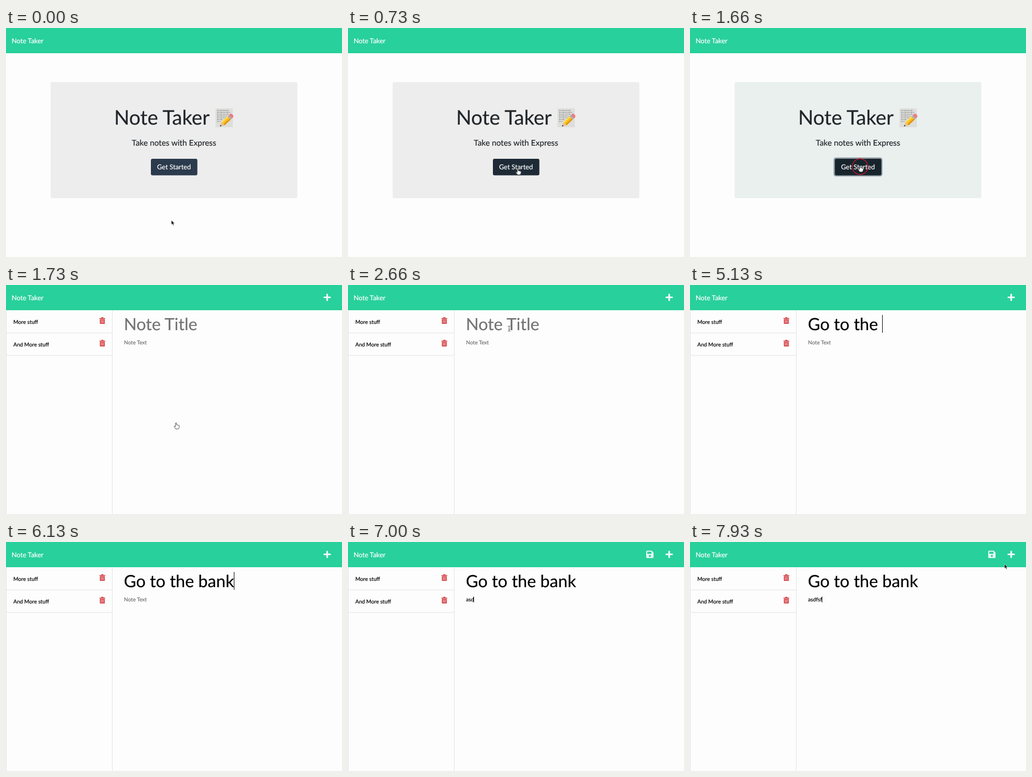
An HTML page for the animation above (8 s loop, 640 by 436 pixels).

```html
<!DOCTYPE html>
<html lang="en">
<head>
<meta charset="utf-8">
<title>Note Taker</title>
<style>
  html, body { margin: 0; width: 100%; height: 100%; overflow: hidden; background: #fdfdfd; }
  svg { display: block; width: 640px; height: 436px; font-family: Lato, sans-serif; }
  text { white-space: pre; fill: currentColor; stroke: currentColor; stroke-width: .2; text-rendering: geometricPrecision; }
  .brand, .btn { font-size: 12.75px; color: #fff; }
  .item, .body { font-size: 10.2px; }
  .title { font-size: 32.05px; }
  .dark { color: #212529; }
  .hint { color: #737373; }
  .rule { fill: none; stroke: #e3e3e3; }

  /* Everything runs on one 8 s loop. */
  .home, .notes, .ring, .arrow, .hand, .beam, .panel, .button, .focus {
    animation: 8s step-end infinite;
  }
  .home { animation-name: home; }
  .notes { animation-name: notes; }
  .panel { animation-name: panel; }
  .button { animation-name: button; }
  .focus { animation-name: focus; }
  .ring { animation-name: ring; fill: none; stroke: #c4182f; stroke-width: 1.4; }
  .arrow { animation-name: arrow; }
  .hand { animation-name: hand; }
  .beam { animation-name: beam; }
  .pointer { animation: move 8s ease-in-out infinite; }

  @keyframes home { 0% { visibility: visible } 21.625%, 100% { visibility: hidden } }
  @keyframes notes { 0% { visibility: hidden } 21.625%, 100% { visibility: visible } }
  @keyframes panel { 0% { fill: #ededed } 19.1%, 100% { fill: #eaf0ee } }
  @keyframes button { 0% { fill: #2b3a4c } 7.5% { fill: #1e2b37 } 19.1%, 100% { fill: #18242c } }
  @keyframes focus { 0% { opacity: 0 } 19.1%, 100% { opacity: 1 } }
  @keyframes ring {
    0%, 21.625%, 45%, 100% { visibility: hidden }
    19.1%, 42.5% { visibility: visible }
  }
  @keyframes arrow { 0%, 97.5%, 100% { visibility: visible } 7.5% { visibility: hidden } }
  @keyframes hand { 0%, 28.25%, 100% { visibility: hidden } 7.5% { visibility: visible } }
  @keyframes beam {
    0%, 54%, 97.5%, 100% { visibility: hidden }
    28.25%, 93.25% { visibility: visible }
  }
  @keyframes move {
    0%, .75% { transform: translate(315px, 366px) }
    10.75%, 28% { transform: translate(324px, 262px); animation-timing-function: cubic-bezier(.4, 0, .7, 1) }
    33.25% { transform: translate(307px, 83px); animation-timing-function: ease-out }
    38.25%, 93.25% { transform: translate(307px, 70px) }
    99.1%, 100% { transform: translate(599px, 42px) }
  }
</style>
</head>
<body>
<svg viewBox="0 0 640 436">
  <defs>
    <g id="bin" fill="#d63c40">
      <path d="M0 1.4h3l.7-1.4h3.6l.7 1.4h3v1.7h-11z"/>
      <path d="M.8 3.8h9.4v7.6q0 1.2-1.2 1.2h-7q-1.2 0-1.2-1.2z"/>
      <path d="M3.2 5.2v5.8M5.5 5.2v5.8M7.8 5.2v5.8" stroke="#fdfdfd" stroke-width=".8"/>
    </g>
  </defs>
  <rect width="640" height="436" fill="#fdfdfd"/>
  <rect width="640" height="48" fill="#28d09b"/>
  <text class="brand" x="10.8" y="28.6">Note Taker</text>

  <g class="home">
    <rect class="panel" x="85" y="103" width="470" height="221" rx="3"/>
    <text class="dark" x="206" y="184" font-size="38.2">Note Taker</text>
    <text class="dark" x="320" y="223.5" font-size="15.35" text-anchor="middle">Take notes with Express</text>
    <rect class="focus" x="273.5" y="246.5" width="93" height="36" rx="4.5" fill="#8d99a3"/>
    <rect class="button" x="276" y="249" width="88.5" height="31.5" rx="3"/>
    <text class="btn" x="320" y="269.3" text-anchor="middle">Get Started</text>

    <g transform="translate(399 153)">
      <rect width="33" height="36" fill="#dededb"/>
      <path d="M3 4h23M3 7.5h25M3 11h22M3 14.5h19M3 18h17M3 21.5h11M3 25h7"
            stroke="#77777a" stroke-width="1.1" stroke-dasharray="3 1 1.5 .8 4 1.2"/>
      <g transform="translate(8.5 34.5) rotate(-43)">
        <path d="M0 0l8-4.3v8.6z" fill="#e8c48d"/>
        <path d="M0 0l3-1.6v3.2z" fill="#333"/>
        <path d="M8-4.3h16v8.6h-16z" fill="#f8bd1e"/>
        <path d="M8-4.3h16v2.7h-16z" fill="#ffdc4c"/>
        <path d="M8 1.8h16v2.5h-16z" fill="#df930f"/>
        <path d="M24-4.3h3v8.6h-3z" fill="#a9adb0"/>
        <path d="M27-4.3h3q3 0 3 4.3t-3 4.3h-3z" fill="#e77e86"/>
      </g>
    </g>
  </g>

  <g class="notes">
    <path class="rule" d="M.5 48V436M202.5 48V436M0 91.2H202M.5 130.700q0 3.500 3 3.500H199.500q3 0 3-3.500"/>
    <text class="item" x="14" y="73.6">More stuff</text>
    <text class="item" x="14" y="116.5">And More stuff</text>
    <use href="#bin" x="178" y="61.5"/>
    <use href="#bin" x="178" y="104.5"/>
    <path d="M611.8 18v11M606.300 23.500h11" stroke="#f2fcf8" stroke-width="3.2" stroke-linecap="round"/>
    <path id="save" fill="#e9faf3" fill-rule="evenodd"
          d="M569.500 16.500h9l3.500 3.500v9q0 1.500-1.500 1.500h-11q-1.500 0-1.500-1.500v-11q0-1.500 1.500-1.500z
             M570 18.500v4h8v-4z M575 24.500a2 2 0 1 0 .01 0z"/>
    <text id="title" class="title" x="224.5" y="86.2"></text>
    <text id="body" class="body" x="224.8" y="113.2"></text>
    <rect id="caret" width="1"/>
  </g>

  <g class="pointer">
    <circle class="ring" cy="2" r="15"/>
    <path class="arrow" d="M0 0v8.600l2-1.800 1.400 3.100 1.500-.7-1.400-3h2.800z"
          fill="#111" stroke="#fff" stroke-width=".6"/>
    <path class="hand" d="M-1.200 1q1.200-1.500 2.200 0v3.500q1.300-.7 1.900.3 1.300-.6 1.800.5 1.500-.3 1.500 1.200 0 3-1.700 5.500h-5.300q-1-2.200-3.200-4.600.6-1.700 2.800.1z"
          fill="#fff" stroke="#222" stroke-width=".8"/>
    <path class="beam" d="M-2.500-5q2.500 0 2.500 1.500 0-1.500 2.500-1.500M0-3.500v7M-2.500 5q2.500 0 2.500-1.500 0 1.500 2.500 1.500M-1.200 1.500h2.400"
          fill="none" stroke="#444" stroke-width=".9"/>
  </g>
</svg>
<script>
  const LOOP = 8000, FOCUS = 3450, TAB = 6250;
  const byId = id => document.getElementById(id);
  const caret = byId('caret'), save = byId('save');

  const fields = [
    { el: byId('title'), hint: 'Note Title', value: 'Go to the bank', top: 57, height: 34,
      keys: [3650, 3790, 4190, 4320, 4390, 4520, 4850, 4920, 4990, 5120, 5320, 5450, 5650, 6120] },
    { el: byId('body'), hint: 'Note Text', value: 'asdfsf', top: 104, height: 11,
      keys: [6720, 6850, 6920, 7120, 7320, 7450] }
  ];

  // Shows the characters typed by time t and returns how many there are.
  function type({ el, hint, value, keys }, t) {
    const count = keys.filter(k => k <= t).length;
    el.textContent = count ? value.slice(0, count) : hint;
    el.classList.toggle('hint', !count);
    return count;
  }

  function draw(t) {
    const counts = fields.map(f => type(f, t));
    const active = t < TAB ? 0 : 1;
    const { el, top, height } = fields[active];
    const width = counts[active] ? el.getComputedTextLength() : 0;
    caret.setAttribute('x', Math.floor(+el.getAttribute('x') + width));
    caret.setAttribute('y', top);
    caret.setAttribute('height', height);
    caret.style.opacity = t < FOCUS ? 0 : 1;
    save.style.opacity = counts[1] ? 1 : 0;
  }

  let start;
  function tick(now) {
    start ??= now;
    draw((now - start) % LOOP);
    requestAnimationFrame(tick);
  }
  draw(0);
  requestAnimationFrame(tick);
</script>
</body>
</html>
```
